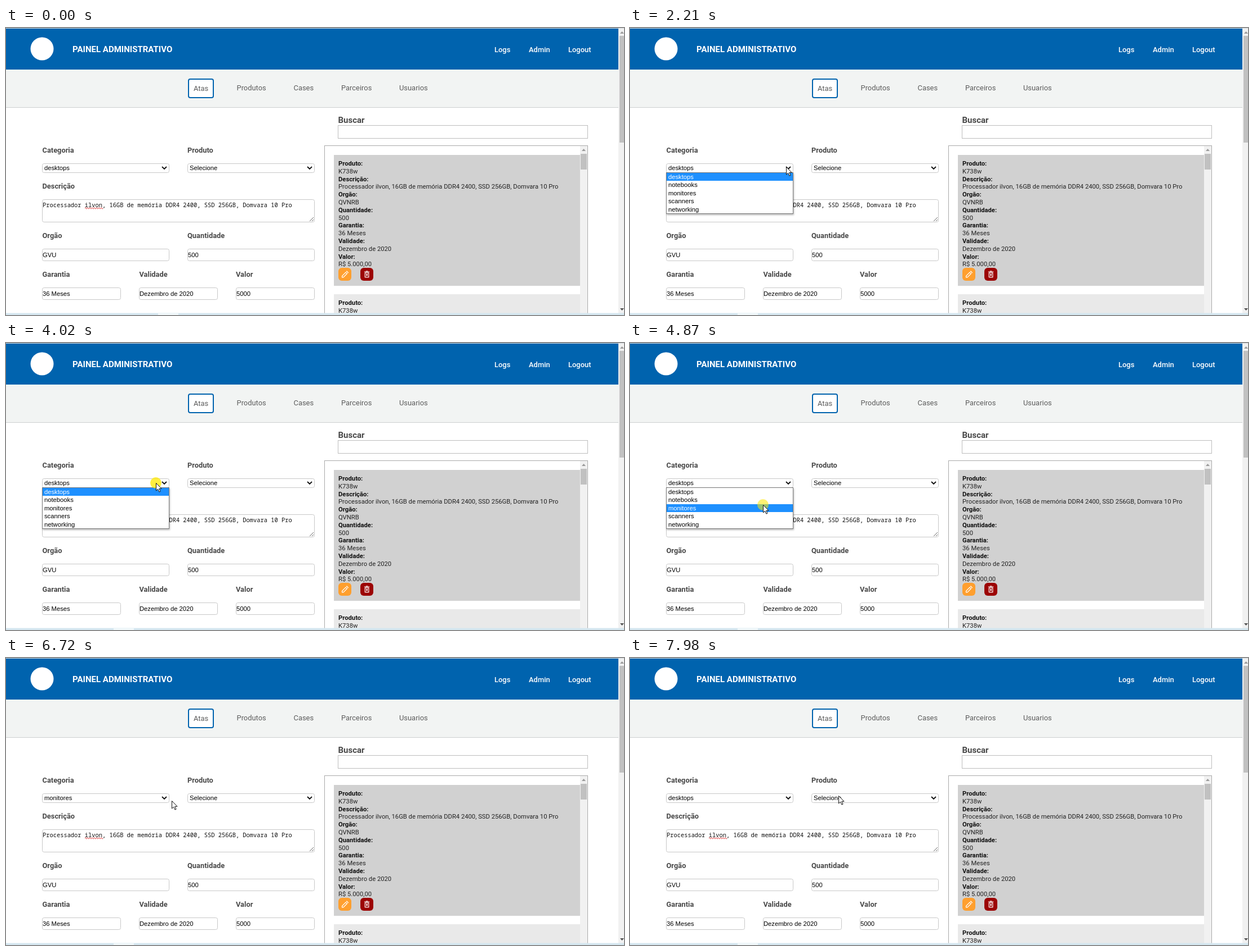
These frames come from a looping animation (1097 by 511 pixels, 8000 ms). An HTML page:

```html
<!DOCTYPE html>
<html lang="pt-BR">
<head>
<meta charset="utf-8">
<title>Painel Administrativo</title>
<style>
html, body { margin: 0; width: 100%; height: 100%; overflow: hidden; background: #fff; }
#stage { position: relative; width: 1097px; height: 511px; overflow: hidden; }
svg { position: absolute; left: 0; top: 0; display: block; }
text { white-space: pre; }
.title { font: 700 15.03px Roboto, sans-serif; fill: #fff; }
.top { font: 500 12.95px Roboto, sans-serif; fill: #fff; }
.nav { font: 400 12.9px Roboto, sans-serif; fill: #5c5c5c; }
.label { font: 700 12.85px Roboto, sans-serif; fill: #484848; }
.search { font: 700 15.03px Roboto, sans-serif; fill: #484848; }
.key { font: 700 11.24px Roboto, sans-serif; fill: #111; }
.val { font: 400 11.24px Roboto, sans-serif; fill: #222; }
.input { font: 400 11.24px "Liberation Sans", Arial, sans-serif; fill: #000; }
.mono { font: 400 10.4px "Noto Sans Mono", monospace; fill: #111; }
.box { fill: #fff; stroke: #c8c8c8; }
#menu {
  position: absolute; top: 257px; width: 224px; border: 1px solid #777; background: #fff;
  font: 400 11.24px/14.45px "Liberation Sans", Arial, sans-serif; color: #000;
  box-shadow: 1px 2px 3px rgba(0, 0, 0, .28);
}
#menu div { padding-left: 3px; height: 14.45px; white-space: pre; }
#menu .on { background: #1e90ff; color: #fff; }
#menu.ghost { border-color: transparent; background: none; color: transparent; box-shadow: 1px 2px 4px rgba(0, 0, 0, .42); }
#menu.ghost .on { background: none; color: transparent; }
</style>
</head>
<body>
<div id="stage">
  <svg id="page" width="1097" height="511"></svg>
  <div id="menu"></div>
  <svg width="1097" height="511">
    <g id="pointer">
      <circle id="click" r="10" fill="#ffe800"/>
      <path d="M.5 .5V14L3.6 11.1L5.9 16.2L8 15.2L5.8 10.3H10Z" fill="#fff" stroke="#111" stroke-width="1"/>
    </g>
  </svg>
</div>
<script>
const $ = id => document.getElementById(id);
const LOOP = 8000, STEP = 75;
const SPEC = 'Processador ilvon, 16GB de memória DDR4 2400, SSD 256GB, Domvara 10 Pro';

// Static page
const rect = (x, y, w, h, fill, rx = 0) => `<rect x="${x}" y="${y}" width="${w}" height="${h}" rx="${rx}" fill="${fill}"/>`;
const box = (x, y, w, h, rx = 3) => `<rect class="box" x="${x + .5}" y="${y + .5}" width="${w - 1}" height="${h - 1}" rx="${rx}"/>`;
const text = (cls, x, y, s, id = '') => `<text class="${cls}" x="${x}" y="${y}"${id && ` id="${id}"`}>${s}</text>`;
const line = (d, color, w = 1) => `<path d="${d}" fill="none" stroke="${color}" stroke-width="${w}"/>`;
const select = (x, s, id) => box(x, 241, 226, 17) + text('input', x + 4, 253, s, id)
  + line(`M${x + 213} 247l4 4l4 -4`, '#111', 1.9);
const field = (x, y, w, s) => box(x, y, w, 22) + text('input', x + 1, y + 15, s);

function card(y, rows) {
  return rows.map(([k, v], i) =>
    text('key', 590, y + i * 27.6, k + ':') + text('val', 590, y + 13.8 + i * 27.6, v)).join('');
}

const rows = [['Produto', 'K738w'], ['Descrição', SPEC], ['Orgão', 'QVNRB'], ['Quantidade', '500'],
  ['Garantia', '36 Meses'], ['Validade', 'Dezembro de 2020'], ['Valor', 'R$ 5.000,00']];

const header = rect(0, 0, 1097, 1, '#d8dde0') + rect(0, 1, 1087, 73, '#0063ae')
  + '<circle cx="64" cy="37" r="20.5" fill="#fff"/>'
  + text('title', 118, 43, 'PAINEL ADMINISTRATIVO')
  + text('top', 867, 42.5, 'Logs') + text('top', 928, 42.5, 'Admin') + text('top', 998, 42.5, 'Logout');

const nav = rect(0, 74, 1087, 67, '#f2f4f3') + rect(0, 141, 1087, 1, '#ccd0d0')
  + '<rect x="324" y="91" width="44" height="33" rx="3" fill="#fff" stroke="#0063ae" stroke-width="2"/>'
  + [[333, 'Atas', 112], [409.5, 'Produtos'], [510.5, 'Cases'], [595, 'Parceiros'], [698, 'Usuarios']]
    .map(([x, s, y = 110.5]) => text('nav', x, y, s)).join('');

const form = [[64.5, 221.5, 'Categoria'], [322, 221.5, 'Produto'], [64.5, 285.5, 'Descrição'],
  [64.5, 374, 'Orgão'], [322, 374, 'Quantidade'],
  [64.5, 443, 'Garantia'], [236.5, 443, 'Validade'], [408, 443, 'Valor']]
  .map(([x, y, s]) => text('label', x, y, s)).join('')
  + select(64, 'desktops', 'category') + select(322, 'Selecione', 'product')
  + box(64, 305, 484, 41) + text('mono', 65, 319, SPEC)
  + line('M140 321' + 'q1 -2.4 2 0t2 0'.repeat(8), '#d33', .9)
  + line('M539 344l7 -7M543 344l3 -3', '#666')
  + field(64, 393, 226, 'GVU') + field(322, 393, 226, '500')
  + field(64, 462, 140, '36 Meses') + field(236, 462, 140, 'Dezembro de 2020') + field(408, 462, 140, '5000');

const pencil = '<path d="M596.6 443.8v-2.3l6.4 -6.4l2.3 2.3l-6.4 6.4ZM604 434.1l1 -1l2.3 2.3l-1 1" fill="none" stroke="#fff" stroke-width="1.2"/>';
const trash = '<path d="M637.3 435.8h6.6v7.8h-6.6ZM635.8 434h9.6M638.8 433.2h3.6M639.3 438l2.6 3M641.9 438l-2.6 3" fill="none" stroke="#fff" stroke-width="1.2"/>';

const list = text('search', 589.5, 169, 'Buscar')
  + '<rect x="589.5" y="173.5" width="443" height="23" fill="#fff" stroke="#bdbdbd"/>'
  + '<rect x="565.5" y="209.5" width="467" height="320" fill="#fff" stroke="#aaa"/>'
  + rect(582, 226, 437, 233, '#d1d1d1') + rect(582, 474, 437, 40, '#e9e9e9')
  + card(245, rows) + card(493, rows.slice(0, 1))
  + rect(590, 427, 23, 23, '#ff9f2e', 6) + pencil
  + rect(629, 427, 23, 23, '#9c0404', 6) + trash
  + rect(1019, 210, 13, 298, '#f1f1f1') + rect(1020, 224, 11, 28, '#c1c1c1')
  + '<path d="M1022 219l3.5 -4l3.5 4Z" fill="#999"/>';

const edges = rect(1087, 1, 10, 507, '#f1f1f1') + rect(1089, 14, 8, 190, '#c1c1c1')
  + '<path d="M1090 10l3.5 -4l3.5 4Z" fill="#999"/><path d="M1090 499l3.5 4l3.5 -4Z" fill="#505050"/>'
  + rect(0, 507.5, 1097, 4, '#d5e7f0')
  + '<rect id="task" y="508" width="36" height="3" fill="#f1f8fb"/>';

$('page').innerHTML = header + nav + form + list + edges;

// Timeline
const CATEGORIES = ['desktops', 'notebooks', 'monitores', 'scanners', 'networking'];
const DESKTOPS = ['Selecione', 'K738w', 'K735t', 'L640s', 'V530p', 'V545w'];
const MONITORS = ['Selecione', 'H47e-35', 'H48e-35', '618K9WNODU/34', '65N7U', '653K4', '653K4'];

// start, end, x, y
const moves = [
  [120, 720, 273, 256], [910, 1260, 327, 250], [1310, 1660, 277, 247],
  [2380, 2680, 340, 249], [2990, 3140, 342, 256], [3400, 3860, 266, 249],
  [4150, 4700, 236, 288], [4950, 5250, 331, 250], [5400, 5480, 343, 251],
  [5810, 5960, 350, 277], [6180, 6260, 343, 262], [6400, 6720, 294, 254],
  [6790, 6960, 272, 252], [7510, 7640, 262, 265], [7720, 7980, 370, 245]
];
const clicks = [[1740, 1900], [2300, 2380], [2680, 2850], [3320, 3400], [3860, 4090],
  [4870, 5020], [5400, 5630], [6260, 6330], [6960, 7270], [7640, 7720]];
// highlight: [from, row]
const menus = [
  { open: 1820, close: 2380, x: 64, items: CATEGORIES, rows: [[0, 0]] },
  { open: 2760, close: 3400, x: 322, items: DESKTOPS, rows: [[0, 0]] },
  { open: 3940, close: 4950, x: 64, items: CATEGORIES, rows: [[0, 0], [4450, 1], [4600, 2]] },
  { open: 5480, close: 6330, x: 322, items: MONITORS, rows: [[0, 0], [5890, 1], [6180, 0]] },
  { open: 7040, close: 7720, x: 64, items: CATEGORIES, rows: [[0, 2], [7510, 1], [7580, 0]] }
];

function pointerAt(t) {
  let x = 873, y = 481;
  for (const [start, end, tx, ty] of moves) {
    if (t < start) break;
    const n = Math.max(1, Math.round((end - start) / STEP));
    const p = Math.min(1, Math.floor((t - start) / (end - start) * n) / n);
    const e = p * p * (3 - 2 * p);
    x += (tx - x) * e;
    y += (ty - y) * e;
  }
  return [Math.round(x), Math.round(y)];
}

let shown = '';
function drawMenu(t) {
  const m = menus.find(m => t >= m.open && t < m.close);
  $('menu').style.display = m ? 'block' : 'none';
  if (!m) return;
  const row = m.rows.filter(r => t >= r[0]).pop()[1];
  const key = m.open + ':' + row;
  if (key !== shown) {
    shown = key;
    $('menu').style.left = m.x + 'px';
    $('menu').innerHTML = m.items.map((s, i) => `<div${i === row ? ' class="on"' : ''}>${s}</div>`).join('');
  }
  $('menu').className = t < m.open + 80 ? 'ghost' : '';
}

function draw(t) {
  const [x, y] = pointerAt(t);
  $('pointer').setAttribute('transform', `translate(${x} ${y})`);
  $('pointer').style.display = t < 120 ? 'none' : '';
  const c = clicks.find(([a, b]) => t >= a && t < b);
  $('click').setAttribute('opacity', !c ? 0 : t - c[0] < 100 ? .55 : .75);
  $('category').textContent = t >= 4950 && t < 7720 ? 'monitores' : 'desktops';
  $('task').setAttribute('x', t < 1740 ? 270 : 191);
  drawMenu(t);
}

function tick() {
  draw(performance.now() % LOOP);
  requestAnimationFrame(tick);
}
tick();
</script>
</body>
</html>
```
